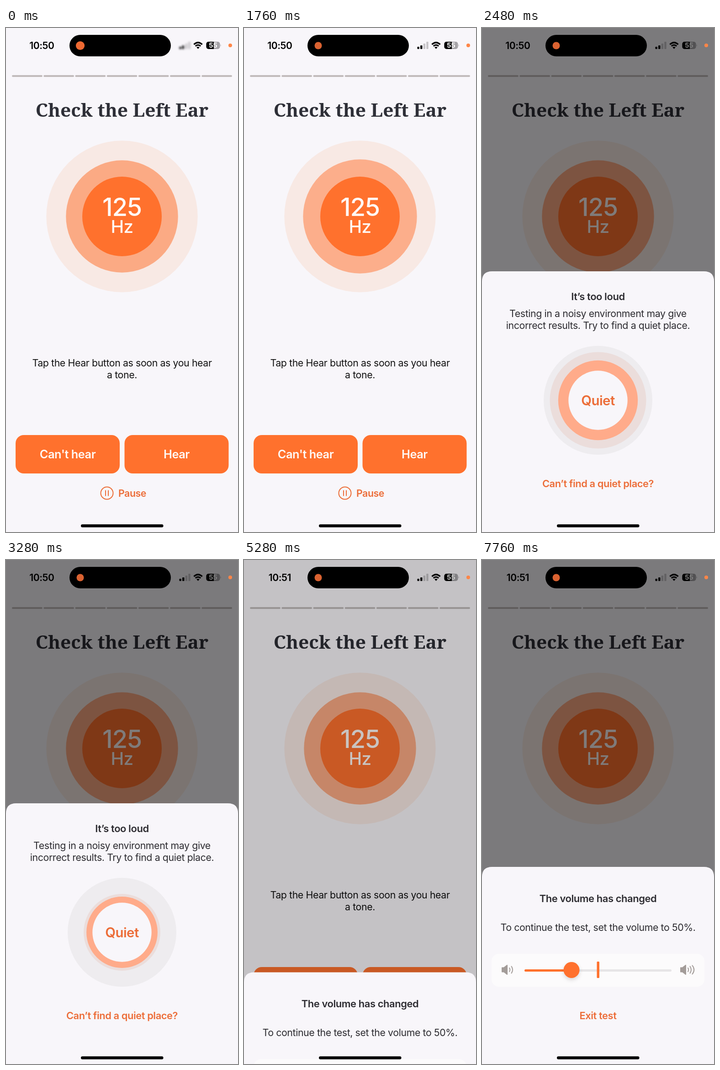
Animation, 508 px wide and 1102 px high, one loop 8 s. Source, as an HTML page:

```html
<!DOCTYPE html>
<html lang="en">
<head>
<meta charset="utf-8">
<title>Hearing check</title>
<style>
  html, body { margin: 0; width: 100%; height: 100%; overflow: hidden; background: #f8f6fa; }
  svg { display: block; width: 100%; height: 100%; }
  text { font-family: Inter, Roboto, sans-serif; font-size: 21.3px; letter-spacing: -.018em; text-anchor: middle; fill: #2c2b30; }
  .title { font-family: "Noto Serif", serif; font-size: 40.7px; font-weight: 700; letter-spacing: 0; fill: #2e2f37; }
  .head { font-size: 21.9px; font-weight: 600; }
  .link { font-size: 21.8px; font-weight: 600; fill: #ec6d38; }
  .btn { font-size: 25.3px; font-weight: 600; fill: #fff9f6; }
  .level { font-size: 29.4px; font-weight: 600; }
  .icon { fill: none; stroke-linecap: round; stroke-linejoin: round; }
</style>
</head>
<body>
<svg viewBox="0 0 508 1102" preserveAspectRatio="none">
  <defs>
    <filter id="soft" x="-50%" y="-50%" width="200%" height="200%">
      <feGaussianBlur id="blur" stdDeviation="0"/>
    </filter>
    <filter id="shadow" x="-50%" y="-50%" width="200%" height="200%">
      <feDropShadow dx="0" dy="4" stdDeviation="4" flood-color="#000" flood-opacity=".14"/>
    </filter>
    <g id="speaker" fill="#a39c99" stroke="#a39c99" stroke-width="2" stroke-linejoin="round">
      <path d="M1 -4.5H5L12 -10V10L5 4.5H1Z"/>
      <path class="icon" d="M17 -4Q19.5 0 17 4M21.5 -7.5Q26.5 0 21.5 7.5"/>
    </g>
  </defs>

  <rect width="508" height="1102" fill="#f8f6fa"/>
  <g id="segments" fill="#c1bbbb"></g>
  <text class="title" x="254" y="193.5">Check the Left Ear</text>

  <circle cx="254" cy="412" r="165.7" fill="#f8e9e4"/>
  <circle id="pulse" cx="254" cy="412" r="122.7" fill="#ff712d"/>
  <circle cx="254" cy="412" r="87" fill="#ff712d"/>
  <text x="254" y="411" style="font-size:54.5px;font-weight:500;fill:#fff8f5">125</text>
  <text x="254" y="448" style="font-size:38.5px;font-weight:500;fill:#fff8f5">Hz</text>

  <text x="254" y="740" style="fill:#111">Tap the Hear button as soon as you hear</text>
  <text x="254" y="766" style="fill:#111">a tone.</text>

  <g fill="#ff712d">
    <rect x="21" y="890" width="228" height="84" rx="18"/>
    <rect x="259.5" y="890" width="228" height="84" rx="18"/>
  </g>
  <text class="btn" x="135" y="941">Can't hear</text>
  <text class="btn" x="373.5" y="941">Hear</text>
  <g class="icon" stroke="#ec6d38" stroke-width="2">
    <circle cx="221" cy="1017" r="13.5"/>
    <path d="M218 1011.5V1022.5M224 1011.5V1022.5"/>
  </g>
  <text class="link" x="276.5" y="1025" style="font-size:21.3px">Pause</text>

  <!-- status bar -->
  <text id="clock" x="78.3" y="45.6" style="font-size:21px;font-weight:600;fill:#000"></text>
  <g id="signal"></g>
  <g class="icon" stroke="#000" stroke-width="3.2" style="stroke-linecap:butt">
    <path d="M411.4 36Q420.5 27.6 429.6 36M414.8 39.6Q420.5 34.6 426.2 39.6"/>
    <path d="M417.2 42.3Q420.5 39.6 423.8 42.3L420.5 45.8Z" fill="#000" stroke="none"/>
  </g>
  <rect x="438.5" y="30" width="30" height="16" rx="5" fill="#a5a3a7"/>
  <path d="M455 30H443.5A5 5 0 0 0 438.5 35V41A5 5 0 0 0 443.5 46H455Z" fill="#000"/>
  <path d="M469.6 35.5Q471.6 38 469.6 40.5Z" fill="#a5a3a7"/>
  <text x="453.6" y="43.4" style="font-size:15px;font-weight:700;fill:#fff;letter-spacing:0">55</text>

  <rect id="dim" width="508" height="1102" fill="#000"/>

  <rect x="139" y="15" width="222" height="47" rx="23.5" fill="#000"/>
  <circle id="live" cx="162.5" cy="38.5"/>
  <circle cx="491" cy="38" r="4" fill="#ff8648"/>

  <g id="noise">
    <path d="M0 600V22Q0 0 22 0H486Q508 0 508 22V600Z" fill="#f8f6fa"/>
    <text class="head" x="254" y="63">It’s too loud</text>
    <text x="254" y="100">Testing in a noisy environment may give</text>
    <text x="254" y="126">incorrect results. Try to find a quiet place.</text>
    <g transform="translate(254 282)">
      <circle r="119" fill="#eeecef"/>
      <circle id="peak" fill="#ebdddb"/>
      <circle id="loud" fill="#ffab8a"/>
      <circle r="64.7" fill="#f8f6fa"/>
      <circle id="blush" r="64.7" fill="#f2e3e0"/>
      <text id="quiet" class="level" y="10.8" style="fill:#ec6d38">Quiet</text>
      <text id="ok" class="level" y="10.8">OK</text>
      <g id="mic" class="icon" stroke="#a19da0" stroke-width="4">
        <rect x="-7.5" y="-26" width="15" height="32" rx="7.5"/>
        <path d="M-16 -4V-2A16 14 0 0 0 16 -2V-4M0 12V20M-11 20.5H11"/>
      </g>
    </g>
    <text class="link" x="254" y="471.5">Can’t find a quiet place?</text>
  </g>

  <g id="volume">
    <path d="M0 460V22Q0 0 22 0H486Q508 0 508 22V460Z" fill="#f8f6fa"/>
    <text class="head" x="254" y="76.5">The volume has changed</text>
    <text x="254" y="140">To continue the test, set the volume to 50%.</text>
    <rect x="21" y="190" width="466" height="72" rx="16" fill="#fcfbfc"/>
    <use href="#speaker" x="43" y="225"/>
    <use href="#speaker" x="434" y="225"/>
    <path class="icon" d="M460.5 215.5Q468 225 460.5 234.5" stroke="#a39c99" stroke-width="2"/>
    <rect x="93" y="224" width="322" height="5" rx="2.5" fill="#e7e5e7"/>
    <rect id="fill" x="93" y="224" height="5" rx="2.5" fill="#ff712d"/>
    <rect x="251.5" y="207" width="5.4" height="36" rx="1.5" fill="#ff712d"/>
    <circle id="knob" cy="225.5" r="17.5" fill="#ff712d" filter="url(#shadow)"/>
    <text class="link" x="254" y="332.5">Exit test</text>
  </g>

  <rect x="164" y="1085.3" width="180.5" height="6.4" rx="3.2" fill="#000"/>
</svg>
<script>
  const LOOP = 8000, SLIDE = 260;
  const $ = id => document.getElementById(id);
  const set = (id, attrs) => {
    for (const k in attrs) $(id).setAttribute(k, attrs[k]);
  };
  const ramp = (t, a, b) => Math.min(1, Math.max(0, (t - a) / (b - a)));
  const ease = (t, a, b) => { const u = ramp(t, a, b); return u * u * (3 - 2 * u); };
  const mix = (a, b, u) => a + (b - a) * u;
  const bump = (t, a, b) => Math.sin(Math.PI * ramp(t, a, b));

  const rect = (x, y, w, h, r, fill) =>
    `<rect x="${x}" y="${y}" width="${w}" height="${h}" rx="${r}"${fill ? ` fill="${fill}"` : ''}/>`;
  $('segments').innerHTML = [...Array(7).keys()].map(i => rect(13 + i * 69.2, 103, 66.8, 4, 2)).join('');
  $('signal').innerHTML = [5, 8, 12, 16]
    .map((h, i) => rect(379.5 + i * 6.6, 46 - h, 4.4, h, 1.2, i < 2 ? '#000' : '#c6c4c7')).join('');

  function slide(id, top, shown) {
    set(id, {
      transform: `translate(0 ${mix(1102, top, shown)})`,
      visibility: shown > 0 ? 'visible' : 'hidden'
    });
  }

  function draw(t) {
    const beat = bump(t, 40, 720) + bump(t, 1180, 1802);
    set('pulse', { r: 122.7 + 9.6 * beat, opacity: .52 - .15 * beat });

    const settle = ease(t, 0, 480);
    set('live', { r: mix(9.6, 8, settle), fill: settle < .5 ? '#ee6932' : '#da6231' });
    set('blur', { stdDeviation: mix(2, 0.01, settle) });
    if (settle < 1) set('signal', { filter: 'url(#soft)' });
    else $('signal').removeAttribute('filter');
    $('clock').textContent = t < 4240 ? '10:50' : '10:51';

    const noise = ease(t, 1782, 1782 + SLIDE) - ease(t, 4778, 4778 + SLIDE);
    const volume = ease(t, 5157, 5157 + SLIDE);
    slide('noise', 532, noise);
    slide('volume', 671, volume);
    set('dim', { opacity: .5 * Math.max(noise, volume) ** 1.12 });

    // noise meter
    const hush = ease(t, 3040, 3520);
    set('peak', { r: t < 3040 ? mix(105.5, 91, ease(t, 2800, 2960)) : mix(91, 77, hush) });
    set('loud', { r: mix(64, 92, ease(t, 2040, 2640)) - 28 * hush });
    set('mic', { opacity: 1 - ramp(t, 2010, 2160) });
    set('blush', { opacity: 1 - ramp(t, 1980, 2160) });
    const calm = ramp(t, 3440, 3520);
    set('quiet', { opacity: ramp(t, 1990, 2200) * (1 - calm) });
    set('ok', { opacity: calm });

    // volume slider
    const x = 236 - 20 * ease(t, 6440, 6720) - 18 * ease(t, 6920, 7200) - 2 * ramp(t, 7700, 7760);
    set('knob', { cx: x });
    set('fill', { width: x - 93 });
  }

  const start = performance.now();
  function tick() {
    draw((performance.now() - start) % LOOP);
    requestAnimationFrame(tick);
  }
  draw(0);
  requestAnimationFrame(tick);
</script>
</body>
</html>
```
